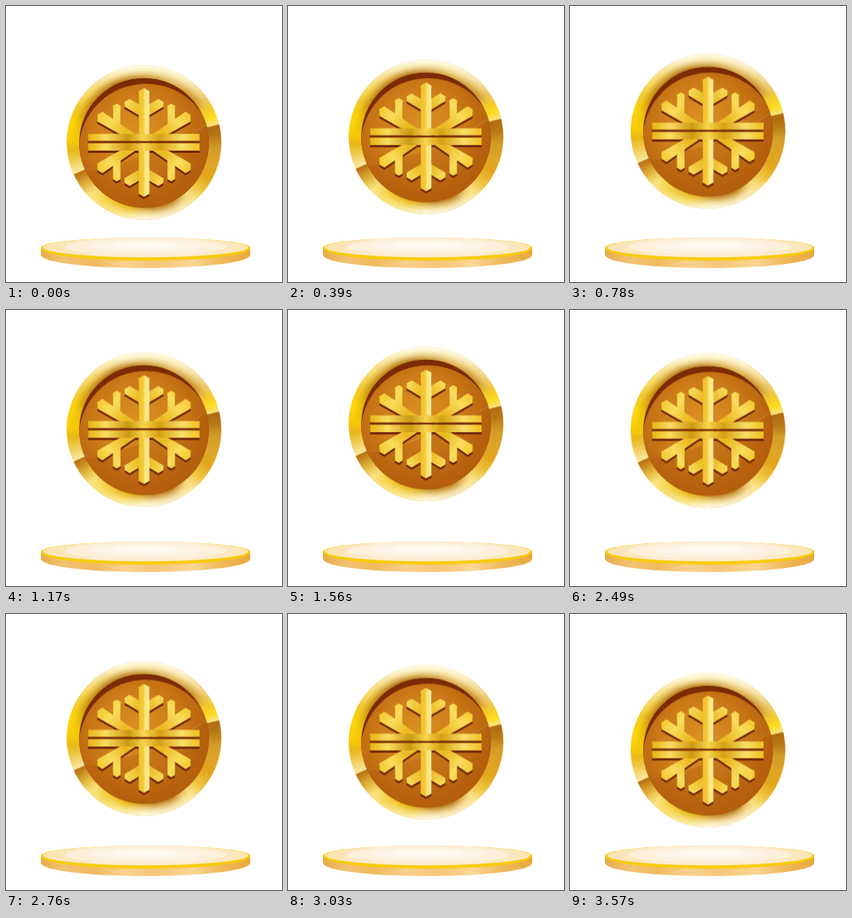
An HTML page without scripts that plays this animation: 355x355 px, repeating every 3600 ms.

```html
<!DOCTYPE html>
<html lang="en">
<head>
<meta charset="utf-8">
<title>Floating coin</title>
<style>
  html, body { margin: 0; width: 100%; height: 100%; overflow: hidden; background: #fff; }
  svg { position: absolute; left: 0; top: 0; width: 355px; height: 355px; }
  .coin { position: absolute; left: 0; top: 0; width: 355px; height: 355px;
          animation: bob 1.8s linear infinite alternate; }
  .rim {
    position: absolute; left: 78px; top: 76px; width: 199px; height: 199px; border-radius: 50%;
    background: conic-gradient(#f9e48c, #f6da80 20deg, #eec860 40deg, #e6b840 55deg, #f4cc28 64deg,
      #fddc20 70deg, #fbe27c 76deg, #b06c10 77deg, #b87814 85deg, #d29c28 95deg, #dfa526 108deg,
      #e2a61c 118deg, #f0c440 130deg, #f8de78 140deg, #f6d878 148deg, #e0b040 158deg,
      #e6bc50 168deg, #f0cc50 180deg, #f2c818 195deg, #f4d038 215deg, #fae070 225deg,
      #e0b038 235deg, #b87010 245deg, #fbe8a0 246deg, #f0ca50 256deg, #e8b818 264deg,
      #f6cc08 272deg, #fbd60c 285deg, #f0c418 298deg, #f4cc30 310deg, #f0cc50 325deg, #f9e48c);
  }
  .rim::before, .rim::after { content: ""; position: absolute; inset: 0; border-radius: 50%; }
  /* amber shade along the inner edge */
  .rim::before {
    background: radial-gradient(closest-side, #a8640a 83%, #b8740a00 95%);
    mask-image: conic-gradient(#0009, #0005 25deg, #0008 50deg, #0000 62deg 140deg, #000c 155deg,
      #000c 170deg, #0004 190deg, #0000 215deg 270deg, #000a 305deg, #000c 335deg, #0009);
  }
  /* pale glow along the outer edge */
  .rim::after {
    background: radial-gradient(closest-side, #fffbe800 85%, #fffbe8 98%);
    mask-image: conic-gradient(#000e, #000c 30deg, #0006 50deg, #0000 65deg 130deg, #000b 155deg,
      #000e 180deg, #0008 205deg, #0000 235deg 290deg, #0006 315deg, #000e 345deg, #000e);
  }
  @keyframes bob { to { transform: translateY(-33.3px); } }
</style>
</head>
<body>
<svg viewBox="0 0 355 355">
  <defs>
    <linearGradient id="side">
      <stop offset="0" stop-color="#e6ac48"/><stop offset=".12" stop-color="#f3c274"/>
      <stop offset=".25" stop-color="#f0b95e"/><stop offset=".4" stop-color="#f9d28e"/>
      <stop offset=".55" stop-color="#f6c678"/><stop offset=".72" stop-color="#f9d594"/>
      <stop offset=".85" stop-color="#f0ba5c"/><stop offset="1" stop-color="#e8a83c"/>
    </linearGradient>
    <linearGradient id="plate">
      <stop offset="0" stop-color="#fae3b0"/><stop offset=".25" stop-color="#fdecd0"/>
      <stop offset=".75" stop-color="#fdecd0"/><stop offset="1" stop-color="#fae6b8"/>
    </linearGradient>
  </defs>
  <path d="M45 311V320C45 330 105 337 179.500 337S314 330 314 320V311Z" fill="url(#side)"/>
  <path d="M45 311C45 303 105 298 179.500 298S314 303 314 311C314 321 254 327.500 179.500 327.500S45 321 45 311Z" fill="#f6cc08"/>
  <ellipse cx="179.500" cy="310.500" rx="132" ry="12.700" fill="url(#plate)"/>
  <ellipse cx="180" cy="309.500" rx="104" ry="10" fill="#fef0dc"/>
  <ellipse cx="180" cy="308.500" rx="72" ry="7" fill="#fef4e6"/>
  <ellipse cx="180" cy="308" rx="42" ry="4" fill="#fff9f0"/>
</svg>

<div class="coin">
  <div class="rim"></div>
  <svg viewBox="0 0 355 355">
    <defs>
      <radialGradient id="floor" cx=".44" cy=".38" r=".6">
        <stop offset="0" stop-color="#dc9220"/><stop offset=".45" stop-color="#cf7f1a"/>
        <stop offset=".8" stop-color="#bb6810"/><stop offset="1" stop-color="#b5600e"/>
      </radialGradient>
      <linearGradient id="stem" gradientUnits="userSpaceOnUse" x1="-7" y1="0" x2="7" y2="0">
        <stop offset="0" stop-color="#efc02a"/><stop offset=".48" stop-color="#f4cc3c"/>
        <stop offset=".55" stop-color="#fbe272"/><stop offset="1" stop-color="#fdeb9c"/>
      </linearGradient>
      <linearGradient id="bar">
        <stop offset="0" stop-color="#e8b410"/><stop offset=".16" stop-color="#f9dc60"/>
        <stop offset=".36" stop-color="#cf9810"/><stop offset=".5" stop-color="#f6d650"/>
        <stop offset=".64" stop-color="#d8a010"/><stop offset=".84" stop-color="#f8de68"/>
        <stop offset="1" stop-color="#f0c020"/>
      </linearGradient>
      <linearGradient id="arm" gradientUnits="userSpaceOnUse" x1="-60" y1="-50" x2="-5" y2="-10">
        <stop offset="0" stop-color="#f0c018"/><stop offset=".4" stop-color="#fadc5c"/>
        <stop offset=".75" stop-color="#eab820"/><stop offset="1" stop-color="#f4cc3c"/>
      </linearGradient>
      <clipPath id="hole"><circle cx="177.500" cy="176" r="83.500"/></clipPath>
      <g id="quarter">
        <path d="M-60-35.500L-53.500-39.500-12-11V2H-9L-60-27Z"/>
        <path d="M-40-22V-47L-35-50-30-47V-19Z"/>
        <path d="M-25-52L-18.500-56 0-45V-34H-5L-25-46Z"/>
      </g>
      <g id="arms">
        <use href="#quarter"/>
        <use href="#quarter" transform="scale(-1 1)"/>
        <use href="#quarter" transform="scale(1 -1)"/>
        <use href="#quarter" transform="scale(-1)"/>
      </g>
      <path id="post" d="M-7-66L0-70 7-66V66L0 70-7 66Z"/>
      <path id="bars" d="M-72-11H71.500V-2H-72ZM-72 1H71.500V10.500H-72Z"/>
    </defs>
    <g clip-path="url(#hole)">
      <circle cx="177.500" cy="176" r="83.500" fill="#7c2b05"/>
      <circle cx="180" cy="186.500" r="86.500" fill="url(#floor)"/>
      <path d="M94 216Q150 201 190 188T262 150V260H94Z" fill="#a9540a" opacity=".3"/>
      <path d="M120 209Q160 198 190 188T262 150" fill="none" stroke="#dc9a3a" opacity=".5"/>
    </g>
    <g transform="translate(177.500 175.500)">
      <g fill="#74290a" transform="translate(0 3)">
        <use href="#arms"/><use href="#post"/><use href="#bars"/>
      </g>
      <use href="#arms" fill="url(#arm)"/>
      <use href="#post" fill="url(#stem)"/>
      <path d="M-72-2H71.500V1H-72Z" fill="#7a300a"/>
      <use href="#bars" fill="url(#bar)"/>
    </g>
  </svg>
</div>
</body>
</html>
```
